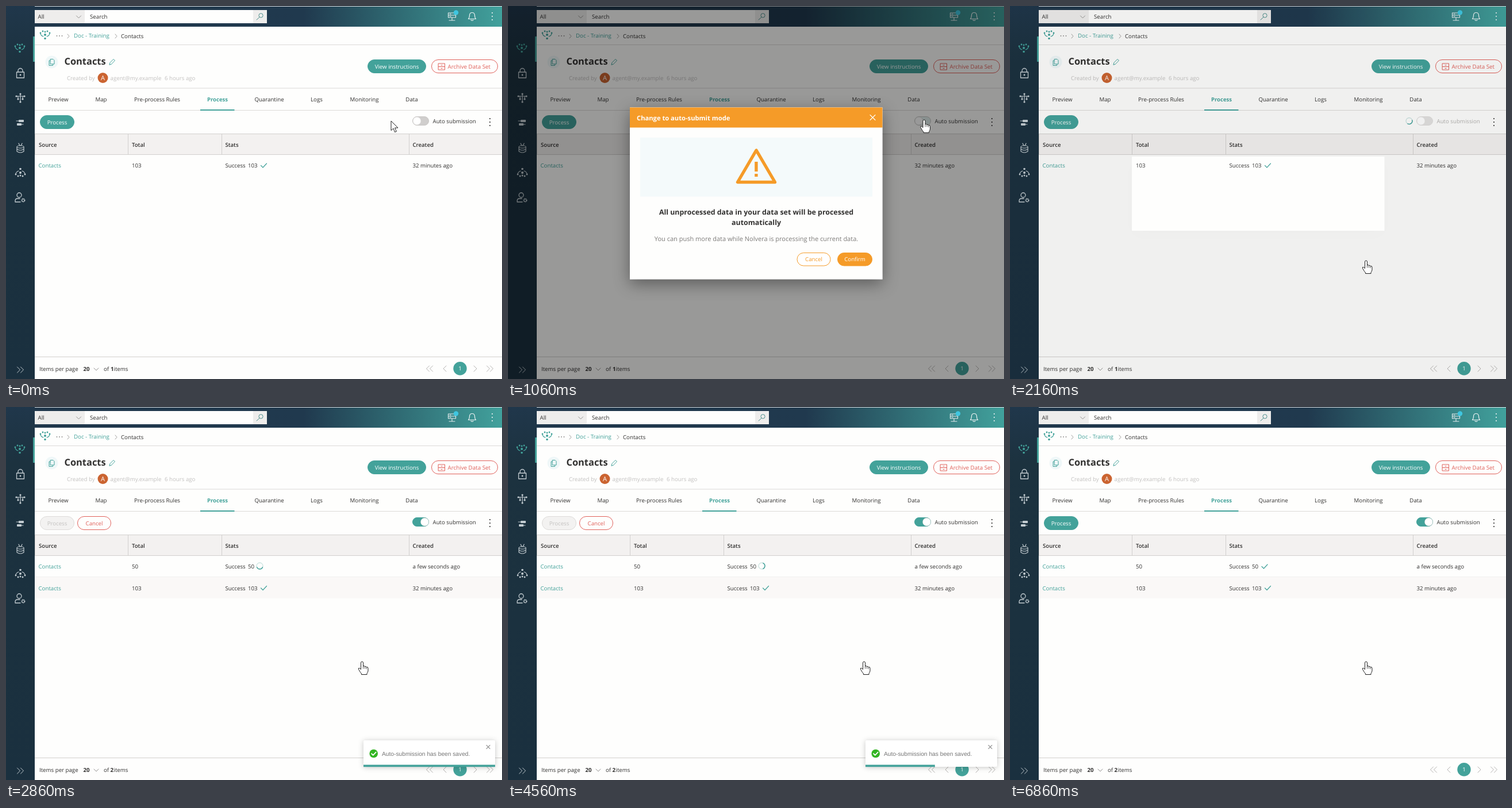
Recreate the animation shown at these times as an HTML page. Size 863x649 px, loop 8 s.

```html
<!DOCTYPE html>
<html lang="en">
<head>
<meta charset="utf-8">
<title>Auto submission</title>
<style>
html, body { margin: 0; width: 100%; height: 100%; overflow: hidden; background: #fefefd; }
svg { display: block; width: 863px; height: 649px; }
text { font: 9.7px "Open Sans", "Noto Sans", sans-serif; fill: #323130; white-space: pre; text-rendering: geometricPrecision; }
.b { font-weight: 700; }
.h { font-weight: 600; }
.m { text-anchor: middle; }
.teal { fill: #43a29a; }
.red { fill: #e0605a; }
.white { fill: #fff; }
.pale { fill: #c3c1c0; }
.line { fill: none; stroke-linecap: round; stroke-linejoin: round; }
</style>
</head>
<body>
<svg id="stage" viewBox="0 0 863 649"></svg>
<script>
const TEAL = '#43a29a', RED = '#e0605a', ORANGE = '#f59b28', EDGE = '#dcdad8', ICON = '#c3ccd1';

const text = (x, y, s, cls = '', size = 9.7, more = '') =>
  `<text x="${x}" y="${y}" class="${cls}" style="font-size:${size}px;${more}">${s}</text>`;
const rect = (x, y, w, h, fill, more = '') =>
  `<rect x="${x}" y="${y}" width="${w}" height="${h}" fill="${fill}" ${more}/>`;
const dot = (x, y, r, fill, more = '') => `<circle cx="${x}" cy="${y}" r="${r}" fill="${fill}" ${more}/>`;
const line = (d, stroke, w = 1, more = '') => `<path class="line" d="${d}" stroke="${stroke}" stroke-width="${w}" ${more}/>`;
const group = (id, body, more = '') => `<g id="${id}" ${more}>${body}</g>`;
const at = (x, y, body) => `<g transform="translate(${x} ${y})">${body}</g>`;
const pill = (x, y, w, h, fill, stroke, label, cls) =>
  rect(x + .5, y + .5, w - 1, h - 1, fill, `rx="${h / 2 - .5}" stroke="${stroke}"`) +
  text(x + w / 2, y + h / 2 + 3.5, label, 'm ' + cls);
const dots3 = (x, y, fill) => [-6, 0, 6].map(d => dot(x, y + d, 1.1, fill)).join('');
const check = (x, y) => line(`M${x} ${y}l3.5 3.5l6.5 -7`, TEAL, 1.2);
const spinner = (id, x, y) => at(x, y, dot(0, 0, 5.5, 'none', 'stroke="#cbe3e0" stroke-width="1.3"') +
  line('M-5 -2.3A5.5 5.5 0 0 1 5 -2.3', TEAL, 1.4, `id="${id}"`));
const chevron = (x, y, dir, stroke) => line(`M${x} ${y - 5}l${5 * dir} 5l${-5 * dir} 5`, stroke, 1);
const double = (x, y, dir, stroke) => chevron(x - 3 * dir - 2.5 * dir, y, dir, stroke) + chevron(x + .5 * dir, y, dir, stroke);
const down = (x, y) => line(`M${x - 4} ${y - 2}l4 4l4 -4`, '#8a8886', .9);
const toggle = (id, track, knobX) => group(id,
  rect(707.5, 192.5, 28, 15, track, 'rx="7.5" stroke="' + (knobX > 720 ? TEAL : '#c9c7c5') + '"') + dot(knobX, 200, 7, '#fff', 'stroke="#c9c7c5" stroke-width=".5"'));

const fan = c => line('M-8 -2Q-7 2 -3 3M8 -2Q7 2 3 3', c, 1.1) + dot(0, 0, 2, c) + dot(0, 6.5, 1.8, c) +
  [[-8, -3], [8, -3], [-4, -6], [4, -6], [0, -5]].map(([x, y]) => dot(x, y, 1.4, c)).join('');

const row = (y, count, ago, mark) => text(56.5, y + 3.5, 'Contacts', 'teal') + text(219, y + 3.5, count) +
  text(381.5, y + 3.5, 'Success') + text(421, y + 3.5, count) + text(707.5, y + 3.5, ago) + mark;

const sidebar = rect(0, 0, 50, 649, 'url(#side)') + rect(47, 53, 3, 44, TEAL) +
  at(24, 73, fan(TEAL)) +
  at(25, 117, line('M-6.5 -2h13v10h-13zM-4 -2v-2.500a4 4 0 0 1 8 0v2.500', ICON, 1.3) + dot(0, 3, 1.4, ICON)) +
  at(25, 159, line('M-7 -2h14M0 -6v14M-4 3v-5M4 3v-5', ICON, 1.2) +
    [[-7, -2], [7, -2], [0, -6], [-4, 3], [4, 3], [0, 8]].map(([x, y]) => dot(x, y, 1.6, ICON)).join('')) +
  at(25, 203, rect(-3, -5, 9, 4, ICON, 'rx="1"') + rect(-6, 1, 8, 4, ICON, 'rx="1"') + line('M-7 -3h4M2 3h3', ICON)) +
  at(25, 247, line('M-6 -2v8q6 4 12 0v-8M-6 2q6 4 12 0M-3 -8l2 4M3 -8l-2 4', ICON, 1.2) +
    '<ellipse cy="-2" rx="6" ry="2.200" fill="none" stroke="' + ICON + '"/>') +
  at(25, 290, '<g transform="scale(1 -1)">' + fan(ICON) + '</g>') +
  at(24, 333, dot(-1, -4, 4, 'none', `stroke="${ICON}" stroke-width="1.3"`) + line('M-8 8v-2q0 -4 4 -4h4M-8 8h9', ICON, 1.3) +
    dot(6, 5, 2.4, 'none', `stroke="${ICON}" stroke-width="2" stroke-dasharray="1.500 .6"`)) +
  double(25, 633, 1, ICON);

const topbar = rect(0, 0, 863, 36, 'url(#bar)') + rect(0, 0, 863, 1, '#d9dde0') + dot(24, 18.5, 9, '#cfd6db') +
  rect(50, 7, 87, 23, '#eeedec') + text(55.5, 21.5, 'All') + down(126.5, 19) +
  rect(137, 7, 293, 23, '#fefefd') + text(146, 22, 'Search') + rect(430, 7, 24, 23, '#eeedec') +
  dot(443.5, 16.5, 3.6, 'none', 'stroke="#4c8f8c"') + line('M441 19.500l-5 4.500', '#4c8f8c') +
  line('M769.500 12h13v4h-13zM769.500 16h13v4h-13zM776 20v5M771 25h10M772 14h2M772 18h2', '#e8eef0', 1.1) + dot(783, 11.5, 4.2, '#3fc6e0') +
  line('M804.500 22.500q2 -2 2 -6q0 -5 4.500 -5t4.500 5q0 4 2 6zM809 24.500q2 1.500 4 0', '#eef3f4', 1.2) + dots3(846, 18, '#eef3f4');

const tabs = [[91, 'Preview'], [165.5, 'Map'], [263, 'Pre-process Rules'], [458, 'Quarantine'], [540.5, 'Logs'], [623.5, 'Monitoring'], [706, 'Data']];
const heads = [[57, 'Source'], [219, 'Total'], [381.5, 'Stats'], [707.5, 'Created']];

const page = rect(0, 0, 863, 649, '#fefefd') + topbar + sidebar +
  at(68, 50, fan(TEAL)) + [88.5, 93, 97.5].map(x => dot(x, 52, .9, '#8a8886')).join('') +
  line('M107 49l3 3.500l-3 3.500M190 49l3 3.500l-3 3.500', '#8a8886', .8) + text(118, 55, 'Doc - Training', 'teal') + text(200, 55.5, 'Contacts') +
  rect(50, 67, 813, 1, EDGE) +
  dot(79.5, 97.5, 11, '#eff7f8') + line('M77.500 92.500h4.500l2 2v6.500h-6.500zM77 95h-2v8.500h6.500v-2', TEAL) +
  text(101.5, 102, 'Contacts', 'b', 16.4) + line('M180 102l1 -3.500l6 -6l2.500 2.500l-6 6z', TEAL) +
  text(106, 129, 'Created by', 'pale') + dot(168.5, 125, 9, '#cb6431') + text(168.5, 129.3, 'A', 'm white', 11) +
  text(181.5, 129, 'agent@my.example', 'pale') + text(276, 129, '6 hours ago', 'pale') +
  pill(629, 93, 102, 24, TEAL, TEAL, 'View instructions', 'white') +
  pill(740, 93, 116, 24, 'none', RED, '', '') + text(768.5, 108.8, 'Archive Data Set', 'red', 9.8) +
  line('M752.500 100h11v11h-11zM752.500 105.500h11M757 103h2M757 108.500h2', RED) +
  rect(50, 142.500, 813, 1, EDGE) + tabs.map(([x, s]) => text(x, 166, s, 'm')).join('') + text(368, 166, 'Process', 'b m teal', 9.5) +
  rect(50, 181, 813, 1, EDGE) + rect(338, 180, 59.5, 2, TEAL) + dots3(842, 202, '#323130') +
  rect(50, 222, 813, 37, '#f3f1f0') + rect(50, 222, 813, 1, '#d2d0ce') + rect(50, 258, 813, 1, '#d2d0ce') +
  [50, 212, 375, 701].map(x => rect(x, 222, 1, 37, '#d2d0ce')).join('') +
  heads.map(([x, s]) => text(x, 244.5, s, 'h', 9.6)).join('') +
  rect(50, 610, 813, 1, '#d2d0ce') + text(58, 634.5, 'Items per page') + text(134.5, 634.8, '20', 'b') + down(157, 632) + text(170, 634.5, 'of') + text(187.5, 634.5, 'items') +
  double(737, 631, -1, '#b5b3b1') + chevron(766, 631, -1, '#b5b3b1') + dot(790, 630.7, 11.7, TEAL) + text(790, 634.2, '1', 'm white') +
  chevron(814, 631, 1, '#b5b3b1') + double(842, 631, 1, '#b5b3b1');

const ready = group('ready', pill(59, 190, 60, 24, TEAL, TEAL, 'Process', 'white'));
const busy = group('busy', pill(59, 190, 60, 24, '#f3f2f1', '#dddbd9', 'Process', 'pale') + pill(124, 190, 59, 24, 'none', RED, 'Cancel', 'red'));
const submission = toggle('off', '#d0cecd', 715) + toggle('hover', '#e2efee', 715) + toggle('on', TEAL, 728.5) +
  text(742.5, 203.7, 'Auto submission', '', 9.7, '" id="label') + group('wait', spinner('spinA', 694.5, 200));

const before = group('before', row(277.5, 103, '32 minutes ago', check(443.5, 277.5)) + text(182, 634.5, '1', 'b'));
const after = group('after', rect(50, 295.5, 813, 1, '#e6e4e2') + rect(50, 296, 813, 37, '#faf8f7') +
  row(277.5, 50, 'a few seconds ago', group('running', spinner('spinB', 441.5, 276.5)) + group('done', check(438, 277.5))) +
  row(315, 103, '32 minutes ago', check(443.5, 315)) + text(181.500, 634.5, '2', 'b'));

const dialog = group('dialog', rect(212, 176.5, 439.5, 35, ORANGE) + text(224, 198.5, 'Change to auto-submit mode', 'b white', 11.2) +
  line('M630 189.500l9 9M639 189.500l-9 9', '#fff', 1.1) + rect(230, 229, 404, 102.5, '#f4fafb') +
  line('M432 251L399.500 306.500H464.500Z', ORANGE, 5.4) + rect(429.2, 271, 5.4, 17, ORANGE) + rect(429.2, 292, 5.4, 5, ORANGE) +
  text(432, 363, 'All unprocessed data in your data set will be processed', 'b m', 12.4) + text(432, 380.5, 'automatically', 'b m', 12.4) +
  text(432, 408.5, 'You can push more data while Nolvera is processing the current data.', 'm', 11, 'fill:#7d7b79') +
  pill(502.5, 429, 59, 23.5, '#fff', ORANGE, 'Cancel', 'or') + pill(573, 429, 61, 23.5, ORANGE, ORANGE, 'Confirm', 'white'));

const toast = group('toast', rect(622, 580, 229, 46, '#fff', 'rx="2" style="filter:drop-shadow(0 1px 5px rgba(0,0,0,.22))"') +
  dot(639.7, 603, 7.3, '#33b523') + line('M636 603.200l2.700 2.700l5 -5.200', '#fff', 1.7) +
  text(654, 606.5, 'Auto-submission has been saved.', '', 10.23, "font-family:'Liberation Sans',Arial,sans-serif;fill:#757575") +
  line('M836 588.500l6 6M842 588.500l-6 6', '#999', 1.2) + rect(622, 622.5, 229, 3.7, TEAL, 'id="progress"'));

const cursor = group('cursor',
  '<path id="arrow" d="M0 0V16.500L4 13L6.500 19.500L9.300 18.300L6.600 12H12Z"/>' +
  '<path id="hand" d="M-2 2Q-2 0 0 0T2 2V8Q3.500 6.500 5 8.500Q6.700 7.500 7.800 9.500Q10.500 9 10.500 11.500V16Q10 19 8.500 20.500V22.500H-1V21Q-3 19 -4.500 16Q-7 12.500 -6 11.500Q-4.500 10.500 -2 13.500Z"/>' +
  line('M2 8v4M5 8.500v3.500M7.800 9.500v3', '#222', .8, 'id="fingers"'), 'fill="#fff" stroke="#222" stroke-width="1" stroke-linejoin="round"');

document.getElementById('stage').innerHTML = `<defs>
  <linearGradient id="bar"><stop offset="0" stop-color="#20374b"/><stop offset=".6" stop-color="#20394e"/><stop offset="1" stop-color="#41a19c"/></linearGradient>
  <linearGradient id="side" x2="0" y2="1"><stop offset="0" stop-color="#20374b"/><stop offset=".15" stop-color="#1c323f"/><stop offset="1" stop-color="#1a303f"/></linearGradient>
  </defs><style>.or{fill:${ORANGE}}</style>` + page + ready + busy + submission + before + after +
  '<path id="shade" fill-rule="evenodd"/>' +
  '<rect id="box" x="212" width="439.500" fill="#fefefd" style="filter:drop-shadow(0 8px 14px rgba(0,0,0,.4))"/>' + dialog + toast + cursor;

const $ = id => document.getElementById(id);
const show = (id, on) => $(id).style.display = on ? '' : 'none';
const set = (id, name, value) => $(id).setAttribute(name, value);

// Linear interpolation through [time, value] pairs
function keys(t, list) {
  if (t <= list[0][0]) return list[0][1];
  for (let i = 1; i < list.length; i++) {
    const [a, u] = list[i - 1], [b, v] = list[i];
    if (t < b) return u + (v - u) * (t - a) / (b - a);
  }
  return list[list.length - 1][1];
}
const ease = x => (x = Math.min(1, Math.max(0, x)), x * x * (3 - 2 * x));

function draw(t) {
  const saved = t >= 2460, finished = t >= 6860, loading = t >= 1970 && !saved;

  const first = ease((t - 160) / 540), second = ease((t - 1060) / 670);
  const x = 670 + 54 * first - 104.5 * second, y = 200 - 2 * first + 245 * second;
  const onToggle = x > 707 && y < 208, hand = onToggle || (y > 429 && x < 634);
  set('cursor', 'transform', `translate(${x} ${y})`);
  show('arrow', !hand); show('hand', hand); show('fingers', hand);

  const hover = t < 1970 && (onToggle || t >= 1060);
  show('off', !saved && !hover); show('hover', hover); show('on', saved);
  set('hover', 'stroke', TEAL);
  set('off', 'opacity', loading ? .6 : 1);
  $('label').style.fill = loading ? '#b3b1af' : '';
  show('wait', loading);
  show('before', !saved); show('after', saved);
  show('ready', !saved || finished); show('busy', saved && !finished);
  show('running', !finished); show('done', finished);
  set('spinA', 'transform', `rotate(${120 + (Math.min(t, 2260) - 2100) * .37})`);
  set('spinB', 'transform', `rotate(${180 + (t - 2860) * 360 / 971})`);

  // The modal shrinks once confirmed, then fades away
  const open = t >= 1060 && t < 2260, full = t < 1970;
  const top = full ? 176.5 : 262, height = full ? 299 : 129;
  show('shade', open); show('box', open); show('dialog', open && full);
  set('shade', 'd', `M0 0H863V649H0ZM212 ${top}h439.500v${height}h-439.500z`);
  set('shade', 'opacity', keys(t, [[2060, .4], [2100, .36], [2160, .055], [2240, 0]]));
  set('box', 'y', top); set('box', 'height', height);
  set('box', 'opacity', keys(t, [[2060, 1], [2100, .86], [2160, .03], [2200, 0]]));

  show('toast', saved && t < 6600);
  const shift = keys(t, [[2460, 900], [2680, -25], [2745, 10], [2800, -5], [2840, 0], [6345, 0], [6440, -20], [6580, 290]]);
  set('toast', 'transform', `translate(${shift} 0)`);
  set('progress', 'width', keys(t, [[2963, 229], [6345, 0]]));
}

function frame(now) {
  draw(now % 8000);
  requestAnimationFrame(frame);
}
draw(0);
requestAnimationFrame(frame);
</script>
</body>
</html>
```
